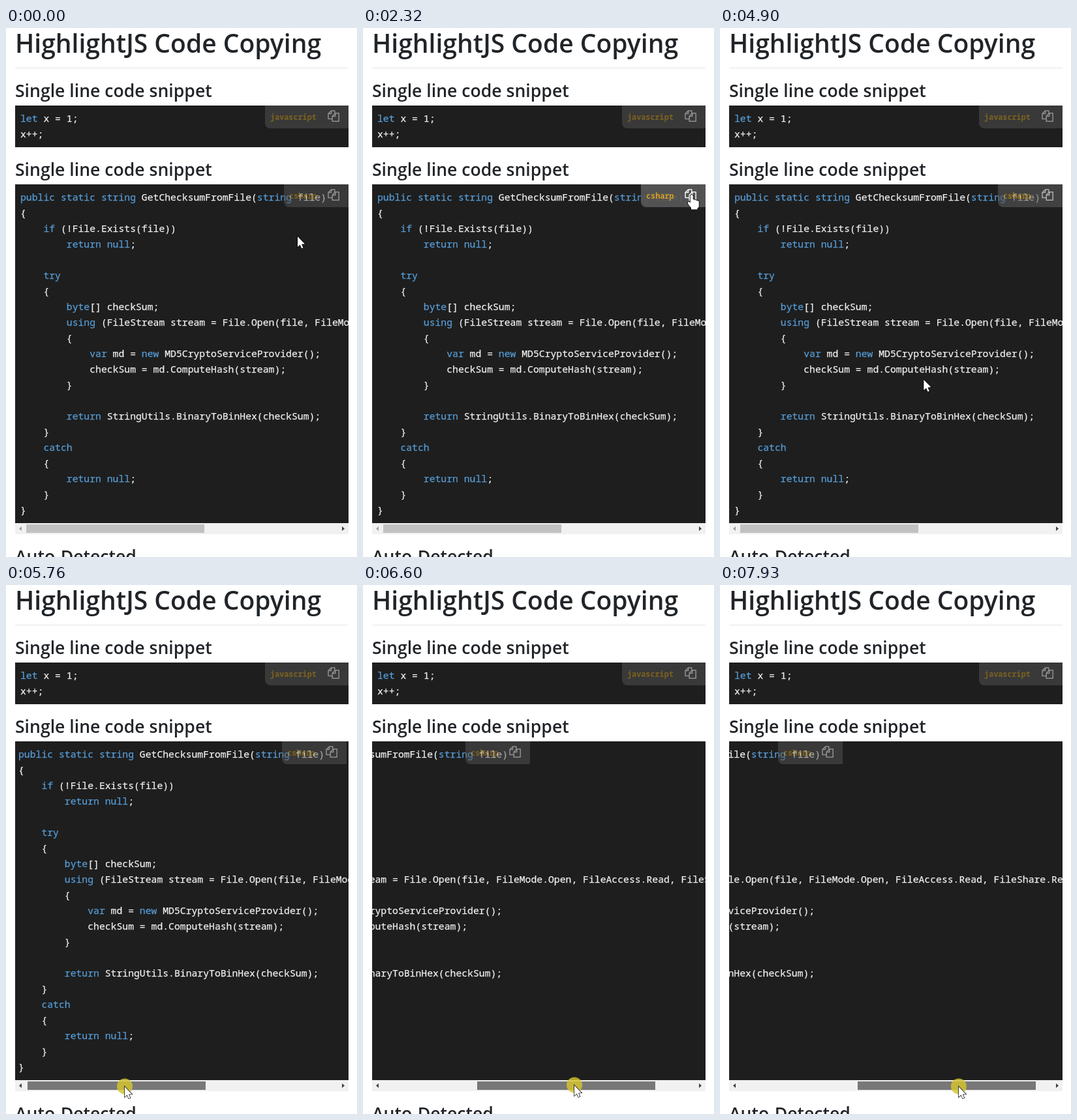
Write an HTML page with a canvas that moves like this. It is 538 by 812 pixels and loops after 8000 ms.

```html
<!DOCTYPE html>
<html lang="en">
<head>
<meta charset="utf-8">
<title>HighlightJS Code Copying</title>
<style>
  html, body { margin: 0; width: 100%; height: 100%; overflow: hidden; background: #fff; }
  canvas { display: block; }
</style>
</head>
<body>
<canvas id="stage" width="538" height="812"></canvas>
<script>
const LOOP = 8000;
const LEFT = 14, RIGHT = 525, WIDTH = RIGHT - LEFT, PAD = 8, LINE = 24;
const SCROLL_RATIO = 1.875;
const GRAB_X = 180.4, DRAG_START = 5760, DRAG_LAG = 60;
const HOVER_IN = 350, HOVER_OUT = 4560, FADE = 500;
const TIP_DELAY = 250;
const SANS = '"Open Sans", "Noto Sans", sans-serif';
const MONO = '"Noto Sans Mono", "DejaVu Sans Mono", monospace';
const KEYWORDS = /\b(let|public|static|string|if|return|null|try|byte|using|var|new|catch)\b/;

const jsCode = ['let x = 1;', 'x++;'];
const csCode = `public static string GetChecksumFromFile(string file)
{
    if (!File.Exists(file))
        return null;

    try
    {
        byte[] checkSum;
        using (FileStream stream = File.Open(file, FileMode.Open, FileAccess.Read, FileShare.Read))
        {
            var md = new MD5CryptoServiceProvider();
            checkSum = md.ComputeHash(stream);
        }

        return StringUtils.BinaryToBinHex(checkSum);
    }
    catch
    {
        return null;
    }
}`.split('\n');

// The pointer rests between moves
const home = { x: 447, y: 320 };
const moves = [
  { from: 80, to: 620, x: 474, y: 268 },
  { from: 1200, to: 1480, x: 491, y: 257 },
  { from: 1950, to: 2320, x: 504, y: 256 },
  { from: 2740, to: 3020, x: 449, y: 261 },
  { from: 3150, to: 3510, x: 501, y: 258 },
  { from: 3980, to: 4120, x: 481, y: 260 },
  { from: 4460, to: 5280, x: 178, y: 763 },
  { from: 5360, to: 5440, x: 182, y: 770 },
  { from: DRAG_START, to: 6510, x: 324, y: 768 },
  { from: 6600, to: 7060, x: 385, y: 771 },
  { from: 7210, to: 7330, x: 317, y: 770 },
  { from: 7390, to: 8100, x: 374, y: 770 }
];

const stage = document.getElementById('stage');
const ctx = stage.getContext('2d');

const clamp = v => Math.max(0, Math.min(1, v));
const smooth = u => u * u * (3 - 2 * u);
const overIcon = p => p.x > 484 && p.y > 246 && p.y < 266;

function pointerAt(t) {
  let { x, y } = home, rest = 0;
  for (const m of moves) {
    if (t < m.from) break;
    const u = smooth(clamp((t - m.from) / (m.to - m.from)));
    x += (m.x - x) * u;
    y += (m.y - y) * u;
    rest = t - m.to;
  }
  return { x, y, rest };
}

function label(c, text, x, y, font, color) {
  c.font = font;
  c.fillStyle = color;
  c.fillText(text, x, y);
}

function heading(text, y, size) {
  label(ctx, text, LEFT, y, `600 ${size}px ${SANS}`, '#212529');
}

function box(x, y, w, h, color) {
  ctx.fillStyle = color;
  ctx.fillRect(x, y, w, h);
}

function polygon(c, points) {
  c.beginPath();
  points.forEach(([x, y]) => c.lineTo(x, y));
  c.closePath();
}

// Sheet of paper with its top left corner folded
function sheet(c, x, y, w, h) {
  const fold = 4.6;
  polygon(c, [[x, y + fold], [x + fold, y], [x + w, y], [x + w, y + h], [x, y + h]]);
  c.fill();
  c.stroke();
  c.beginPath();
  c.moveTo(x + fold, y);
  c.lineTo(x + fold, y + fold);
  c.lineTo(x, y + fold);
  c.stroke();
}

// Prerendered so that the whole badge shares one opacity
function makeBadge(text, width) {
  const layer = document.createElement('canvas');
  layer.width = width;
  layer.height = 35;
  const c = layer.getContext('2d');
  c.fillStyle = '#555';
  c.beginPath();
  c.roundRect(0, 0, width, 35, [0, 0, 0, 8]);
  c.fill();
  c.strokeStyle = '#fff';
  c.lineWidth = 1.5;
  c.lineJoin = 'round';
  sheet(c, width - 31, 8, 9.8, 12.4);
  sheet(c, width - 24.8, 11.8, 10, 12.4);
  label(c, text, 8, 22, `bold 11.8px ${MONO}`, '#daa520');
  return layer;
}

const jsBadge = makeBadge('javascript', 128);
const csBadge = makeBadge('csharp', 99);

function codeBlock(lines, top, height, scroll, badge, alpha) {
  box(LEFT, top, WIDTH, height, '#1e1e1e');
  ctx.save();
  ctx.beginPath();
  ctx.rect(LEFT, top, WIDTH, height);
  ctx.clip();
  ctx.translate(-scroll, 0);
  ctx.font = `14.75px ${MONO}`;
  ctx.lineWidth = .25;
  const step = ctx.measureText('0').width;
  lines.forEach((line, row) => {
    let col = 0;
    for (const part of line.split(KEYWORDS)) {
      const x = LEFT + PAD + col * step, y = top + 25 + row * LINE;
      ctx.fillStyle = ctx.strokeStyle = KEYWORDS.test(part) ? '#569cd6' : '#f0f0f0';
      ctx.fillText(part, x, y);
      ctx.strokeText(part, x, y);
      col += part.length;
    }
  });
  ctx.globalAlpha = alpha;
  ctx.drawImage(badge, RIGHT - badge.width, top);
  ctx.restore();
}

function scrollArrow(x, dir, color) {
  polygon(ctx, [[x - 2 * dir, 765], [x + 2 * dir, 768.5], [x - 2 * dir, 772]]);
  ctx.fillStyle = color;
  ctx.fill();
}

function scrollbar(offset, thumbColor) {
  box(LEFT, 760, WIDTH, 17, '#f1f1f1');
  scrollArrow(22, -1, offset > 0 ? '#404040' : '#a0a0a0');
  scrollArrow(517, 1, '#404040');
  box(31 + Math.round(offset), 762, 273, 13, thumbColor);
}

function tooltip(x, y) {
  box(x, y, 114, 25, '#666');
  box(x + 1, y + 1, 112, 23, '#fff');
  label(ctx, 'Copy to clipboard', x + 7, y + 17, `11.7px ${SANS}`, '#575757');
}

const arrow = new Path2D('M0 0V16L3.7 12.7 6.1 18.2 8.5 17.2 6.1 11.8 11 11.4Z');

const hand = new Path2D();
for (let i = 0; i < 4; i++) hand.roundRect(-2.2 + 3 * i, i ? 6 + i : 0, 4, 14 - i, 2);
hand.roundRect(-2.2, 11, 13, 9.5, 3);
hand.rect(-1, 17, 9.6, 5.5);
hand.ellipse(-2.8, 14.8, 4.6, 2, .95, 0, Math.PI * 2);

function pointer(p) {
  const shape = overIcon(p) ? hand : arrow;
  ctx.save();
  ctx.translate(p.x, p.y);
  ctx.strokeStyle = '#000';
  ctx.lineWidth = 1.4;
  ctx.stroke(shape);
  ctx.fillStyle = '#fff';
  ctx.fill(shape);
  ctx.restore();
}

function draw(t) {
  const p = pointerAt(t);
  const dragging = t >= DRAG_START;
  const offset = dragging ? pointerAt(t - DRAG_LAG).x - GRAB_X : 0;
  const hover = clamp((t - HOVER_IN) / FADE) - clamp((t - HOVER_OUT) / FADE);
  const thumbColor = dragging ? '#787878' : p.y > 761 ? '#a8a8a8' : '#c1c1c1';

  box(0, 0, stage.width, stage.height, '#fff');
  heading('HighlightJS Code Copying', 38, 39);
  box(LEFT, 61, WIDTH, 1, '#e5e5e5');
  heading('Single line code snippet', 106, 26.6);
  codeBlock(jsCode, 119, 64, 0, jsBadge, .5);
  heading('Single line code snippet', 227, 26.6);
  codeBlock(csCode, 240, 520, Math.round(offset * SCROLL_RATIO), csBadge, .5 + .45 * hover);
  scrollbar(offset, thumbColor);
  heading('Auto-Detected', 821, 26.6);

  if (overIcon(p) && p.rest > TIP_DELAY) tooltip(p.x + 11, p.y + 15);
  if (dragging) {
    ctx.fillStyle = 'rgba(212, 197, 45, .82)';
    ctx.beginPath();
    ctx.arc(p.x, p.y - .5, 12, 0, Math.PI * 2);
    ctx.fill();
  }
  pointer(p);
}

function frame(now) {
  draw(now % LOOP);
  requestAnimationFrame(frame);
}
requestAnimationFrame(frame);
</script>
</body>
</html>
```
